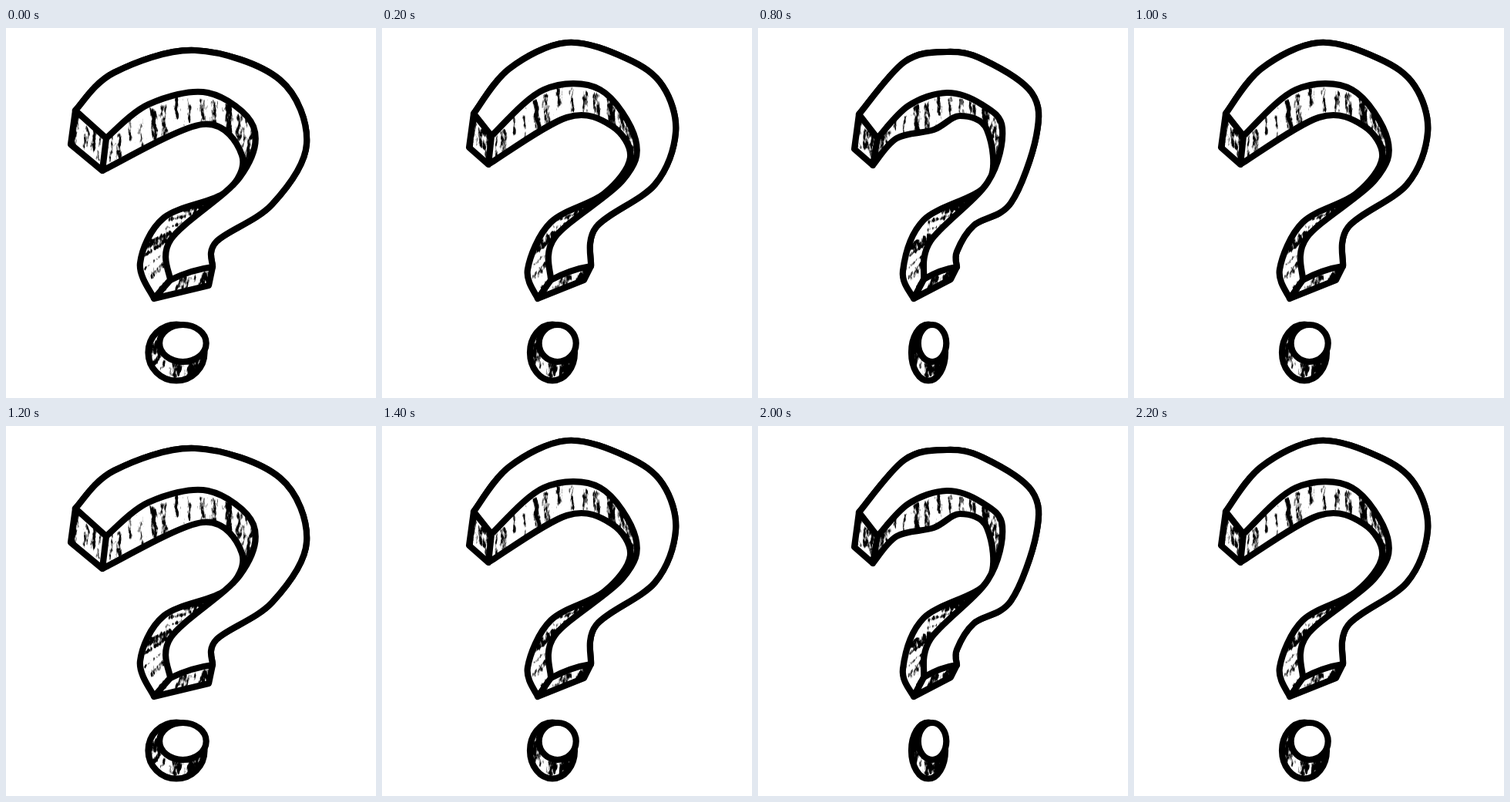
Animation of 480 by 480 pixels, one loop 2.4 s. Source, as an HTML page:

```html
<!DOCTYPE html>
<html lang="en">
<head>
<meta charset="utf-8">
<title>Turning question mark</title>
<style>
  html, body { margin: 0; width: 100%; height: 100%; overflow: hidden; background: #fff; }
  svg { display: block; width: 100vw; height: 100vh; }
  .ink { fill: #fff; stroke: #000; stroke-width: 8.2; stroke-linejoin: round; stroke-linecap: round; }
  .rim { fill: none; }
</style>
</head>
<body>
<svg viewBox="0 0 480 480">
  <defs>
    <!-- Breaks soft strokes into dry brush grain -->
    <filter id="grain" filterUnits="userSpaceOnUse" x="0" y="0" width="480" height="480">
      <feGaussianBlur in="SourceGraphic" stdDeviation="1.8" result="soft"/>
      <feTurbulence type="fractalNoise" baseFrequency=".3 .1" numOctaves="3" seed="4"/>
      <feColorMatrix values="0 0 0 0 0  0 0 0 0 0  0 0 0 0 0  0 0 0 1 0" result="noise"/>
      <feComposite in="soft" in2="noise" operator="arithmetic" k2="2.4" k3="3.5" k4="-2.6"/>
    </filter>
    <clipPath id="inside"><path id="clip"/></clipPath>
  </defs>
  <g clip-path="url(#inside)">
    <g id="shade" filter="url(#grain)" stroke="#000" stroke-linecap="round"></g>
  </g>
  <path id="rim" class="ink rim"/>
  <path id="face" class="ink"/>
</svg>
<script>
const $ = id => document.getElementById(id);

// outer: top left corner to lower right end; inner: lip to heel of the face;
// under: the same run along the far edge; base and foot: outer corners of the end caps.
const wide = {
  outer: '90 107,140 58,245 29,355 67,390 150,345 229,273 277,268 310',
  inner: '213 327,214 274,303 194,321 128,262 84,185 99,130 143',
  under: '192 351,174 305,205 246,285 213,306 165,255 125,125 185',
  base: '263 334', foot: '84 151', radius: 36.5
};
const turned = {
  outer: '119 111,165 53,240 19,318 40,364 75,381 135,354 203,278 258,271 309',
  inner: '219 327,224 272,312 198,329 145,283 80,210 80,142 140',
  under: '202 351,189 313,219 252,288 215,322 168,298 127,240 116,138 177',
  base: '262 327', foot: '113 155', radius: 29
};
const narrow = {
  outer: '131 112,190 44,245 31,292 41,355 84,361 140,328 227,280 256,258 290,258 310',
  inner: '215 326,224 276,298 200,317 130,290 99,245 84,195 101,155 143',
  under: '202 351,188 315,215 249,298 202,297 132,262 114,228 132,180 143,149 178',
  base: '250 326', foot: '125 157', radius: 22
};
const slim = { ...narrow, radius: 18, squeeze: .86 };
const cycle = [wide, turned, narrow, slim, narrow, turned];
const stepMs = 200, axis = 232;

// Smooth open curve through the points.
function spline(points) {
  const at = i => points[Math.max(0, Math.min(points.length - 1, i))];
  return points.slice(1).map((c, i) => {
    const [a, b, e] = [at(i - 1), at(i), at(i + 2)];
    const leave = b.map((v, k) => v + (c[k] - a[k]) / 6);
    const arrive = c.map((v, k) => v - (e[k] - b[k]) / 6);
    return `C${leave} ${arrive} ${c}`;
  }).join('');
}

function seeded(seed) {
  return () => (seed = seed * 16807 % 2147483647) / 2147483647;
}

const mix = (p, q, u) => p.map((v, k) => v + (q[k] - v) * u);
const line = (p, q) => u => mix(p, q, u);
const onOval = ([cx, cy, rx, ry]) => u => {
  const angle = Math.PI * (.1 + u);
  return [cx + rx * Math.cos(angle), cy + ry * Math.sin(angle)];
};
const oval = ([cx, cy, rx, ry]) =>
  `M${cx - rx} ${cy}a${rx} ${ry} 0 1 1 ${2 * rx} 0a${rx} ${ry} 0 1 1 ${-2 * rx} 0Z`;

function along(points) {
  const path = document.createElementNS('http://www.w3.org/2000/svg', 'path');
  path.setAttribute('d', 'M' + points[0] + spline(points));
  const length = path.getTotalLength();
  return u => {
    const { x, y } = path.getPointAtLength(u * length);
    return [x, y];
  };
}

// Random smudges that cross a side panel from its near to its far edge.
function smudges(near, far, count, random) {
  let marks = '';
  for (let i = 0; i < count; i++) {
    const u = (i + .2 + .6 * random()) / count;
    const [p, q] = [near(u), far(u)];
    const from = mix(p, q, .3 * random()), to = mix(p, q, 1 - .4 * random());
    const width = 2.5 + 6.5 * random();
    marks += `<path d="M${from}L${to}" stroke-width="${width}" opacity="${.6 + .4 * random()}"/>`;
  }
  return marks;
}

function build({ squeeze = 1, radius, ...runs }) {
  const points = text => text.split(',').map(pair => {
    const [x, y] = pair.split(' ').map(Number);
    return [axis + (x - axis) * squeeze, y];
  });
  const [outer, inner, under, [base], [foot]] =
    ['outer', 'inner', 'under', 'base', 'foot'].map(name => points(runs[name]));
  const start = outer[0], end = outer.at(-1);
  const lip = inner[0], heel = inner.at(-1);
  const tip = under[0], drop = under.at(-1);
  const bend = mix(end, lip, .5);
  bend[1] -= 5;

  const body = [221, 421, radius, 36.5];
  const top = [221 + radius * .23, 409, radius * .83, 24];
  const head = 'M' + start + spline(outer);
  const solid = `${head}L${base}L${tip}${spline(under)}L${foot}Z${oval(body)}`;
  const random = seeded(29);
  return {
    solid,
    rim: `${solid}M${lip}L${tip}M${heel}L${drop}`,
    face: `${head}Q${bend} ${lip}${spline(inner)}Z${oval(top)}`,
    shade: smudges(along(inner), along(under), 28, random)
      + smudges(line(lip, end), line(tip, base), 5, random)
      + smudges(line(start, heel), line(foot, drop), 4, random)
      + smudges(onOval(top), onOval(body), 9, random)
  };
}

const drawings = new Map([wide, turned, narrow, slim].map(pose => [pose, build(pose)]));
let shown;

function draw(time) {
  const pose = cycle[Math.floor(time / stepMs) % cycle.length];
  if (pose === shown) return;
  shown = pose;
  const art = drawings.get(pose);
  $('clip').setAttribute('d', art.solid);
  $('rim').setAttribute('d', art.rim);
  $('face').setAttribute('d', art.face);
  $('shade').innerHTML = art.shade;
}

const begin = performance.now();
function tick() {
  draw(performance.now() - begin);
  requestAnimationFrame(tick);
}
tick();
</script>
</body>
</html>
```
